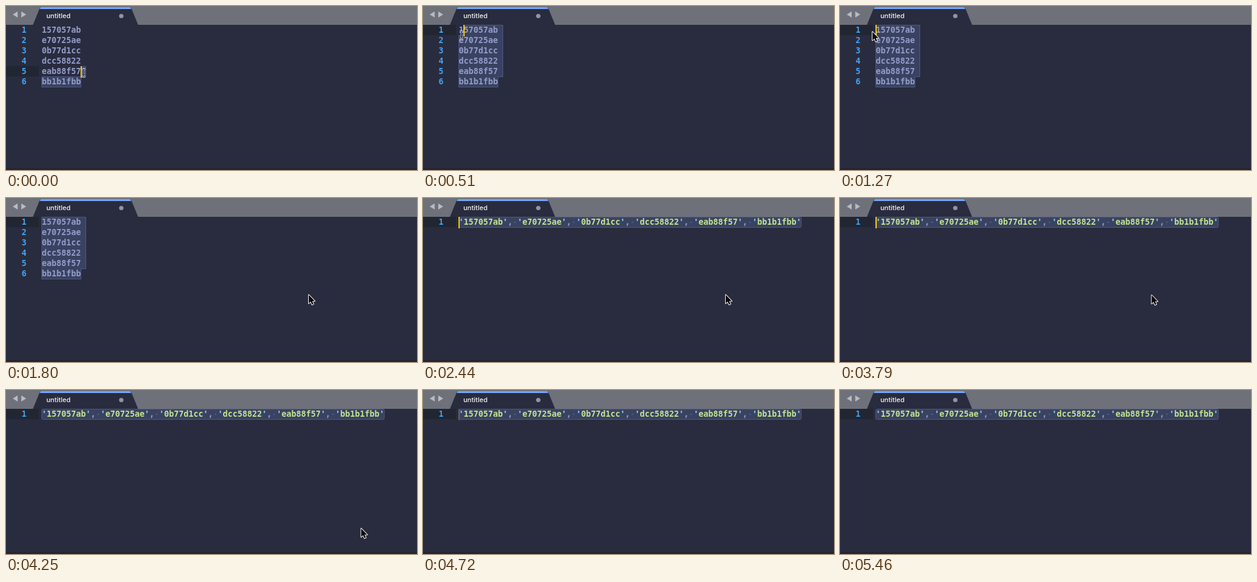
Recreate the animation shown at these times as an HTML page with a canvas. Size 672 px wide and 270 px high, loop 5560 ms.

```html
<!DOCTYPE html>
<html lang="en">
<head>
<meta charset="utf-8">
<title>Editor: lines to list</title>
<style>
  html, body { margin: 0; width: 100%; height: 100%; overflow: hidden; background: #292c3e; }
  canvas { display: block; }
</style>
</head>
<body>
<canvas id="stage" width="672" height="270"></canvas>
<script>
const ctx = document.getElementById('stage').getContext('2d');
const LOOP = 5560, DRAG_END = 630, ARROW_AT = 1270, JOIN_AT = 2380;
const LEFT = 58.5, TOP = 31, CHAR = 8, ROW = 17;
const MONO = 'bold 13.29px "DejaVu Sans Mono", Menlo, monospace';
const color = {
  back: '#292c3e', bar: '#6e717a', text: '#959dcb', string: '#c3e88d', quote: '#89ddff',
  number: '#42a5f5', select: '#3a4261', border: '#4c5885', caret: '#ffcc00', space: '#59638c'
};
const lines = ['157057ab', 'e70725ae', '0b77d1cc', 'dcc58822', 'eab88f57', 'bb1b1fbb'];

const clamp = (v, low, high) => Math.max(low, Math.min(high, v));
const smooth = u => u * u * (3 - 2 * u);
const glide = u => 1 - (1 - u) ** 4;

const moves = [
  { from: 50, to: 570, x: 60.5, y: 45 },
  { from: 630, to: 970, x: 52, y: 42 },
  { from: 1270, to: 1800, x: 494, y: 159 },
  { from: 2800, to: 3030, x: 494, y: 162 },
  { from: 3380, to: 3950, x: 512, y: 159 },
  { from: 3950, to: 4010, x: 516, y: 159 },
  { from: 4130, to: 4720, x: 622, y: 273, ease: glide }
];

function mouseAt(t) {
  let x = 127, y = 110;
  for (const move of moves) {
    const k = (move.ease || smooth)(clamp((t - move.from) / (move.to - move.from), 0, 1));
    x += (move.x - x) * k;
    y += (move.y - y) * k;
  }
  return [x, y];
}

// The caret stays solid until the blink starts, then fades at the end of each half period.
function caretAlpha(t) {
  const half = 608, fade = 170;
  const elapsed = Math.max(0, t - (t < JOIN_AT ? 922 : 2422));
  const k = clamp((elapsed % half - half + fade) / fade, 0, 1);
  return Math.floor(elapsed / half) % 2 ? k : 1 - k;
}

const rowY = row => TOP + row * ROW;

function rect(x, y, w, h, fill) {
  ctx.fillStyle = fill;
  ctx.fillRect(x, y, w, h);
}

function polygon(points, fill) {
  ctx.beginPath();
  points.forEach(([x, y]) => ctx.lineTo(x, y));
  ctx.closePath();
  ctx.fillStyle = fill;
  ctx.fill();
}

function outline(stroke, width) {
  ctx.lineJoin = 'round';
  ctx.strokeStyle = stroke;
  ctx.lineWidth = width;
  ctx.stroke();
}

function text(string, x, y, fill, font = MONO) {
  ctx.font = font;
  ctx.fillStyle = fill;
  ctx.fillText(string, x, y);
}

function drawTabBar() {
  rect(0, 0, 672, TOP, color.bar);
  polygon([[44, TOP], [55, 4], [57, 2], [203, 2], [205, 4], [216, TOP]], color.back);
  polygon([[55, 5], [57, 2], [203, 2], [205, 5]], '#75a5f8');
  polygon([[11, 14], [19, 9], [19, 19]], '#b9bbc0');
  polygon([[33, 14], [25, 9], [25, 19]], '#b9bbc0');
  text('untitled', 66, 20, '#f4f5f8', '500 11px Inter, Roboto, sans-serif');
  ctx.fillStyle = '#9194a0';
  ctx.beginPath();
  ctx.arc(188.5, 16.5, 3.6, 0, 2 * Math.PI);
  ctx.fill();
}

function drawGutter(count, activeRow) {
  rect(0, rowY(activeRow), 54, ROW, '#212632');
  for (let i = 0; i < count; i++) text(i + 1, 25.5, rowY(i) + 13, color.number);
}

// Selection from the given place to the end of the last line.
function drawSelection(row, column) {
  const y = rowY(row) + .5, end = rowY(5) + .5;
  const lastRight = LEFT + 8 * CHAR, right = lastRight + CHAR;
  const first = LEFT + column * CHAR;
  polygon([
    [first, y], [right, y], [right, end], [lastRight, end], [lastRight, end + ROW],
    [LEFT, end + ROW], [LEFT, y + ROW], [first, y + ROW]
  ], color.select);
  outline(color.border, 1);
}

function drawLines() {
  lines.forEach((line, i) => text(line, LEFT, rowY(i) + 13, color.text));
}

function drawJoinedLine() {
  ctx.beginPath();
  ctx.roundRect(LEFT, TOP + .5, 70 * CHAR, ROW, 2);
  ctx.fillStyle = color.select;
  ctx.fill();
  outline(color.border, 1);
  lines.forEach((line, i) => {
    const x = LEFT + i * 12 * CHAR, y = TOP + 13;
    text("'", x, y, color.quote);
    text(line, x + CHAR, y, color.string);
    text("'", x + 9 * CHAR, y, color.quote);
    if (i < lines.length - 1) {
      text(',', x + 10 * CHAR, y, color.text);
      rect(x + 11 * CHAR + 3, TOP + 8, 2, 2, color.space);
    }
  });
}

function drawCaret(row, column, alpha) {
  ctx.globalAlpha = alpha;
  rect(58 + column * CHAR, rowY(row), 2, 19, color.caret);
  ctx.globalAlpha = 1;
}

function drawBeam(x, y) {
  ctx.beginPath();
  for (const side of [-1, 1]) {
    ctx.moveTo(x + side * 2.5, y - 6.5);
    ctx.quadraticCurveTo(x, y - 6.5, x, y - 4.5);
    ctx.lineTo(x, y + 4.5);
    ctx.quadraticCurveTo(x, y + 6.5, x + side * 2.5, y + 6.5);
  }
  ctx.moveTo(x - 2, y + 2.5);
  ctx.lineTo(x + 2, y + 2.5);
  outline('#e8e9ee', 2.8);
  outline('#15161d', 1);
}

function drawArrow(x, y) {
  ctx.save();
  ctx.translate(x + 1, y + .5);
  const shape = [[0, 0], [0, 14], [3.2, 11], [5.4, 16], [7.7, 15], [5.6, 10.2], [9.8, 10.2]];
  polygon(shape, '#08080b');
  outline('#f4f4f6', 2);
  ctx.fill();
  ctx.restore();
}

function draw(t) {
  const [x, y] = mouseAt(t);
  const joined = t >= JOIN_AT, dragging = t < DRAG_END;
  const row = dragging ? Math.floor((y - TOP) / ROW) : 0;
  const column = dragging ? clamp(Math.round((x - LEFT) / CHAR), 0, 8) : 0;

  rect(0, 0, 672, 270, color.back);
  rect(0, 267, 672, 3, '#252432');
  drawTabBar();
  drawGutter(joined ? 1 : lines.length, row);
  if (joined) drawJoinedLine();
  else {
    drawSelection(row, column);
    drawLines();
  }
  drawCaret(row, column, caretAlpha(t));
  (t < ARROW_AT ? drawBeam : drawArrow)(x, y);
}

const start = performance.now();
function frame() {
  draw((performance.now() - start) % LOOP);
  requestAnimationFrame(frame);
}
frame();
</script>
</body>
</html>
```
